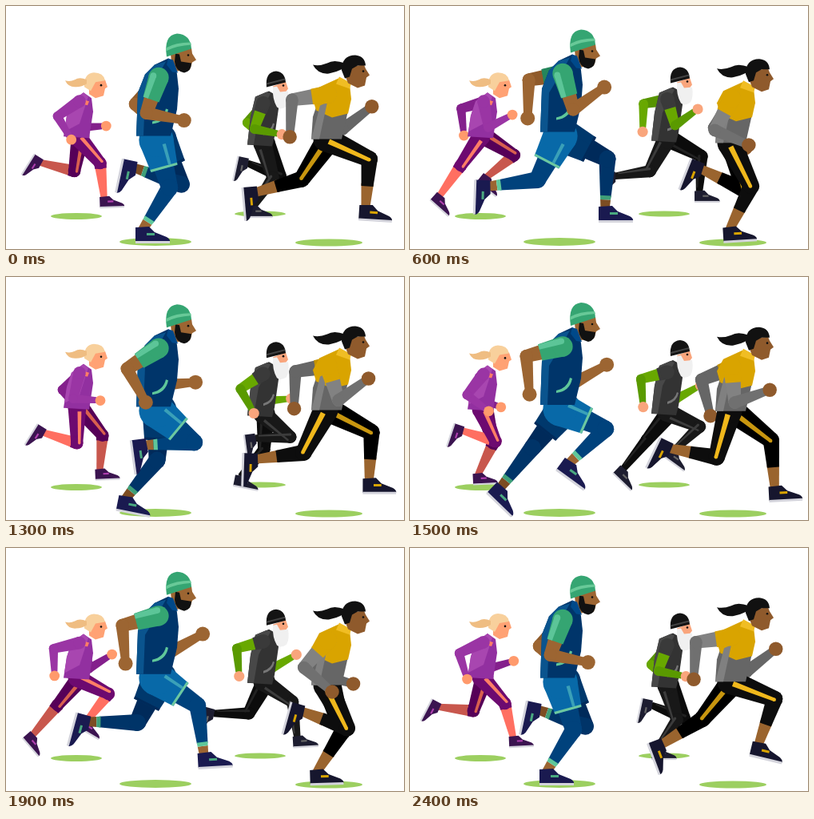
Animation of 498x304 px, one loop 2500 ms. Source, as an HTML page with a canvas:

```html
<!DOCTYPE html>
<html lang="en">
<head>
<meta charset="utf-8">
<title>Runners</title>
<style>
html, body { margin: 0; width: 498px; height: 304px; overflow: hidden; background: #fff; }
canvas { display: block; }
</style>
</head>
<body>
<canvas id="c" width="498" height="304"></canvas>
<script>
const g = document.getElementById('c').getContext('2d');
const POSES = 25, STEP = 100;   // poses per loop, ms per pose
const CYCLE = 24;               // phase units in one full stride
const TAU = 2 * Math.PI;

// Ankle from hip and toe angle at eight even points of a stride, starting at mid-stance
const GAIT = [
  [-18, 117, 0], [-76, 101, 44], [-92, 62, 92], [-68, 42, 122],
  [-29, 38, 102], [10, 70, 36], [56, 91, 0], [49, 106, -2]
];
const THIGH = 62, SHIN = 64, UPPER_ARM = 47, FOREARM = 48;
const legWidth = u => u < 1 ? 32 - 11 * u : 31 - 10 * u;
const armWidth = u => 22 - 6 * u;
const shoe = new Path2D('M-8 -4L9 -5L16 2L31 8Q36 11 35 14L-8 14Z');

// Limb parts: [from, to, near colour, far colour, width factor, side offset],
// with 0..1 along the upper segment and 1..2 along the lower one.
const runners = [
  { // woman in purple
    size: .71, period: 25, phase: -2.9, bob: -3, hip: [89, 166], shoulder: [92, 122],
    shadow: [88, 263, 32, 4], skin: '#ff9a6c', shoe: '#3b1450', trim: '#b040b0',
    leg: [
      [1, 2, '#ff6f61', '#c8574d'], [0, 1, '#6d0a70', '#560058'],
      [1, 1.15, '#6d0a70', '#560058', 1.05], [.1, 1, '#ff7e66', '#d8604f', .22, -3]],
    arm: [[0, 1, '#9a35a4', '#84208c'], [1, 1.85, '#9a35a4', '#84208c']],
    body: [
      ['#9230a0', 'M97 111L107 118L109 135L104 168L72 166L76 140L82 122Z'],
      ['#a846b0', 'M97 111L103 116L92 150L73 160L76 140L82 122Z'],
      ['#ff7e66', 'M87 117L104 122L102 127L85 122Z'],
      ['#ffa274', 'M104 104L110 96L124 95L127 104L124 106L122 115L112 118L104 113Z'],
      ['#f8d09c', 'M98 104Q97 87 110 86Q122 86 124 96L112 98L106 109Z'],
      ['#efbd82', 'M101 95Q92 91 86 95Q80 98 74 96Q78 105 88 104Q95 104 101 100Z']],
    eye: [119, 102]
  },
  { // bearded man in grey
    size: .73, period: 24, phase: 0, bob: 1, hip: [321, 168], shoulder: [322, 118],
    shadow: [318, 260, 32, 3.5], skin: '#f9a57c', shoe: '#1d1d30', trim: '#666',
    leg: [
      [0, 1, '#181818', '#0c0c0c'], [1, 1.95, '#181818', '#0c0c0c'],
      [.15, 1, '#3c3c3c', '#222', .15, 5], [1, 1.85, '#3c3c3c', '#222', .2, 3]],
    arm: [
      [0, 1, '#68a800', '#579400'], [1, 1.85, '#5a9a00', '#68a800'],
      [0, .35, '#3a3a3a', '#2a2a2a', 1.1]],
    body: [
      ['#333', 'M329 103L338 108L341 125L336 160L333 172L302 170L306 135L312 110Z'],
      ['#484848', 'M326 104L331 106L316 135L310 170L302 170L306 135L312 110Z'],
      ['#777', 'M322 155Q332 152 334 143L336 144Q334 155 322 158Z'],
      ['#f9a57c', 'M334 97L350 91L353 100L350 104L338 106Z'],
      ['#f0f0f0', 'M334 98L339 97L343 104L353 103Q355 115 351 122Q344 127 339 123Q333 113 334 98Z'],
      ['#141414', 'M326 98Q324 79 338 78Q349 79 350 92Z'],
      ['#444', 'M326 93L349 87L349 89L326 95Z']],
    eye: [347, 96]
  },
  { // man in blue
    size: 1, period: 24, phase: 0, bob: 1, hip: [188, 164], shoulder: [191, 86],
    shadow: [187, 295, 45, 5], skin: '#9c6532', shoe: '#1a1a50', trim: '#4aa880',
    leg: [
      [1.8, 2, '#9c6532', '#7d4d22'], [0, 1, '#00427c', '#002a5a'],
      [1, 1.75, '#00427c', '#003468'], [1.72, 1.8, '#5fc79a', '#3f9f78'],
      [0, .6, '#0869a8', '#00386c', 1.35], [.55, .6, '#6cc8a0', '#002a5a', 1.35],
      [.12, .55, '#3aa0b8', '#00386c', .14, -8]],
    arm: [
      [0, 1, '#9c6532', '#8f5a2a'], [1, 1.9, '#9c6532', '#9c6532'],
      [0, .62, '#35a572', '#24865c', 1.15], [0, .62, '#5cc598', '#24865c', .35, 7]],
    body: [
      ['#00356a', 'M203 62L212 70L214 82L216 100L214 126L206 159L163 159L165 105L174 82L186 70Z'],
      ['#0a548e', 'M186 70L200 66L190 84L174 110L172 159L163 159L165 105L174 82Z'],
      ['#5fc79a', 'M183 141Q197 138 200 125L203 126Q200 142 183 144Z'],
      ['#9c6532', 'M206 57L232 49L233 56L238 64L233 67L230 76L214 78L207 66Z'],
      ['#111', 'M212 56L217 57L219 66L232 68Q232 78 223 80Q212 78 211 66Z'],
      ['#35a572', 'M201 60Q197 33 214 31Q231 32 232 50Z'],
      ['#68c998', 'M200 49Q212 42 231 42L232 45Q213 46 200 53Z'],
      ['#00498a', 'M203 62L209 64L215 80L208 79L201 70Z']],
    eye: [228, 58]
  },
  { // woman in yellow
    size: .97, period: 25, phase: -6.5, bob: 1, hip: [400, 168], shoulder: [403, 112],
    shadow: [404, 296, 42, 4.5], skin: '#8f5a2c', shoe: '#16162e', trim: '#d9a400',
    leg: [
      [1.5, 2, '#9a642e', '#9a642e'], [0, 1, '#0d0d0d', '#000'],
      [1, 1.55, '#0d0d0d', '#000'], [.08, 1, '#f0b81c', '#c8960f', .22, 1]],
    arm: [
      [0, 1, '#828282', '#666'], [1, 1.88, '#707070', '#666'],
      [0, .45, '#d9a400', '#c49300', 1.05]],
    body: [
      ['#666', 'M388 128L429 128L420 168L382 168L384 140Z'],
      ['#d9a400', 'M416 92L430 100L432 118L428 136L408 141L388 132L384 118L392 103Z'],
      ['#808080', 'M393 126L402 122L392 168L382 168Z'],
      ['#f0bd24', 'M417 90L432 98L430 105L413 99Z'],
      ['#8f5a2c', 'M424 88L432 77L448 75L450 80L455 88L451 91L449 101L440 104L428 98Z'],
      ['#111', 'M420 82Q420 63 437 63Q449 64 450 76L440 76L433 80L430 90L424 92Z'],
      ['#111', 'M424 73Q410 68 402 73Q392 77 384 75Q390 87 404 86Q414 84 424 79Z']],
    eye: [447, 83]
  }
];
for (const r of runners) r.body = r.body.map(([fill, path]) => [fill, new Path2D(path)]);

const mix = (a, b, u) => [a[0] + (b[0] - a[0]) * u, a[1] + (b[1] - a[1]) * u];
const polar = ([x, y], len, turn) => [x + len * Math.cos(turn), y + len * Math.sin(turn)];
// Angle in degrees from straight down, positive towards the front
const hang = (p, len, deg) => polar(p, len, (90 - deg) * TAU / 360);

function dot(x, y, r, fill) {
  g.fillStyle = fill;
  g.beginPath();
  g.arc(x, y, r, 0, TAU);
  g.fill();
}

// Smooth closed curve through the gait points
function gait(phase) {
  const n = GAIT.length, s = (phase / CYCLE % 1 + 1) % 1 * n;
  const i = Math.floor(s), u = s - i;
  const [a, b, c, d] = [-1, 0, 1, 2].map(k => GAIT[(i + k + n) % n]);
  return b.map((p, k) => {
    const q = c[k], m = (q - a[k]) / 2, w = (d[k] - p) / 2;
    return p + u * (m + u * (3 * (q - p) - 2 * m - w + u * (2 * (p - q) + m + w)));
  });
}

function knee(hip, ankle, size) {
  const a = THIGH * size, b = SHIN * size;
  const dx = ankle[0] - hip[0], dy = ankle[1] - hip[1];
  const d = Math.min(Math.hypot(dx, dy), a + b);
  return polar(hip, a, Math.atan2(dy, dx) - Math.acos((a * a + d * d - b * b) / (2 * a * d)));
}

function limb(top, mid, end, parts, width, size, far) {
  for (const [from, to, nearFill, farFill, factor = 1, off = 0] of parts) {
    const [s, e, base] = from < 1 ? [top, mid, 0] : [mid, end, 1];
    const turn = Math.atan2(e[1] - s[1], e[0] - s[0]) + TAU / 4;
    const half = u => width(u) * size * factor / 2;
    const p = polar(mix(s, e, from - base), off, turn);
    const q = polar(mix(s, e, to - base), off, turn);
    const fill = far ? farFill : nearFill;
    g.fillStyle = fill;
    g.beginPath();
    g.moveTo(...polar(p, half(from), turn));
    g.lineTo(...polar(q, half(to), turn));
    g.lineTo(...polar(q, -half(to), turn));
    g.lineTo(...polar(p, -half(from), turn));
    g.fill();
    if (from % 1 === 0) dot(...p, half(from), fill);
    if (to === 1) dot(...q, half(to), fill);
  }
}

function leg(r, phase, dy, far) {
  const [x, y, toe] = gait(phase);
  const hip = [r.hip[0] + (far ? 4 : 0), r.hip[1] + dy];
  const ankle = [r.hip[0] + x * r.size, r.hip[1] + y * r.size];
  limb(hip, knee(hip, ankle, r.size), ankle, r.leg, legWidth, r.size, far);
  g.save();
  g.translate(...ankle);
  g.rotate(toe * TAU / 360);
  g.scale(r.size, r.size);
  g.fillStyle = r.shoe;
  g.fill(shoe);
  g.fillStyle = r.trim;
  g.fillRect(6, 3, 10, 3);
  g.fillStyle = '#d4d4dc';
  g.fillRect(-8, 13, 43, 3);
  g.restore();
}

// Upper arm and forearm swing together, peaking shortly after mid-stance
function arm(r, phase, dy, far) {
  const swing = Math.cos((phase - 5) / CYCLE * TAU);
  const shoulder = [r.shoulder[0] + (far ? 4 : 0), r.shoulder[1] + dy];
  const elbow = hang(shoulder, UPPER_ARM * r.size, -32 + 50 * swing);
  const hand = hang(elbow, FOREARM * r.size, 62 + 66 * swing);
  limb(shoulder, elbow, hand, r.arm, armWidth, r.size, far);
  dot(...hand, 9 * r.size, r.skin);
}

function run(r, time) {
  const near = time * CYCLE / r.period + r.phase, far = near + CYCLE / 2;
  const dy = r.bob + 2.5 * Math.cos(2 * near / CYCLE * TAU);
  arm(r, far, dy, true);
  leg(r, far, dy, true);
  leg(r, near, dy, false);
  g.save();
  g.translate(0, dy);
  for (const [fill, path] of r.body) {
    g.fillStyle = fill;
    g.fill(path);
  }
  dot(...r.eye, 1.3, '#111');
  g.restore();
  arm(r, near, dy, false);
}

function draw(time) {
  g.fillStyle = '#fff';
  g.fillRect(0, 0, 498, 304);
  g.fillStyle = '#9ccf60';
  for (const { shadow: [x, y, rx, ry] } of runners) {
    g.beginPath();
    g.ellipse(x, y, rx, ry, 0, 0, TAU);
    g.fill();
  }
  for (const r of runners) run(r, time);
}

const start = performance.now();
function tick() {
  draw(Math.floor((performance.now() - start) / STEP) % POSES);
  requestAnimationFrame(tick);
}
tick();
</script>
</body>
</html>
```
